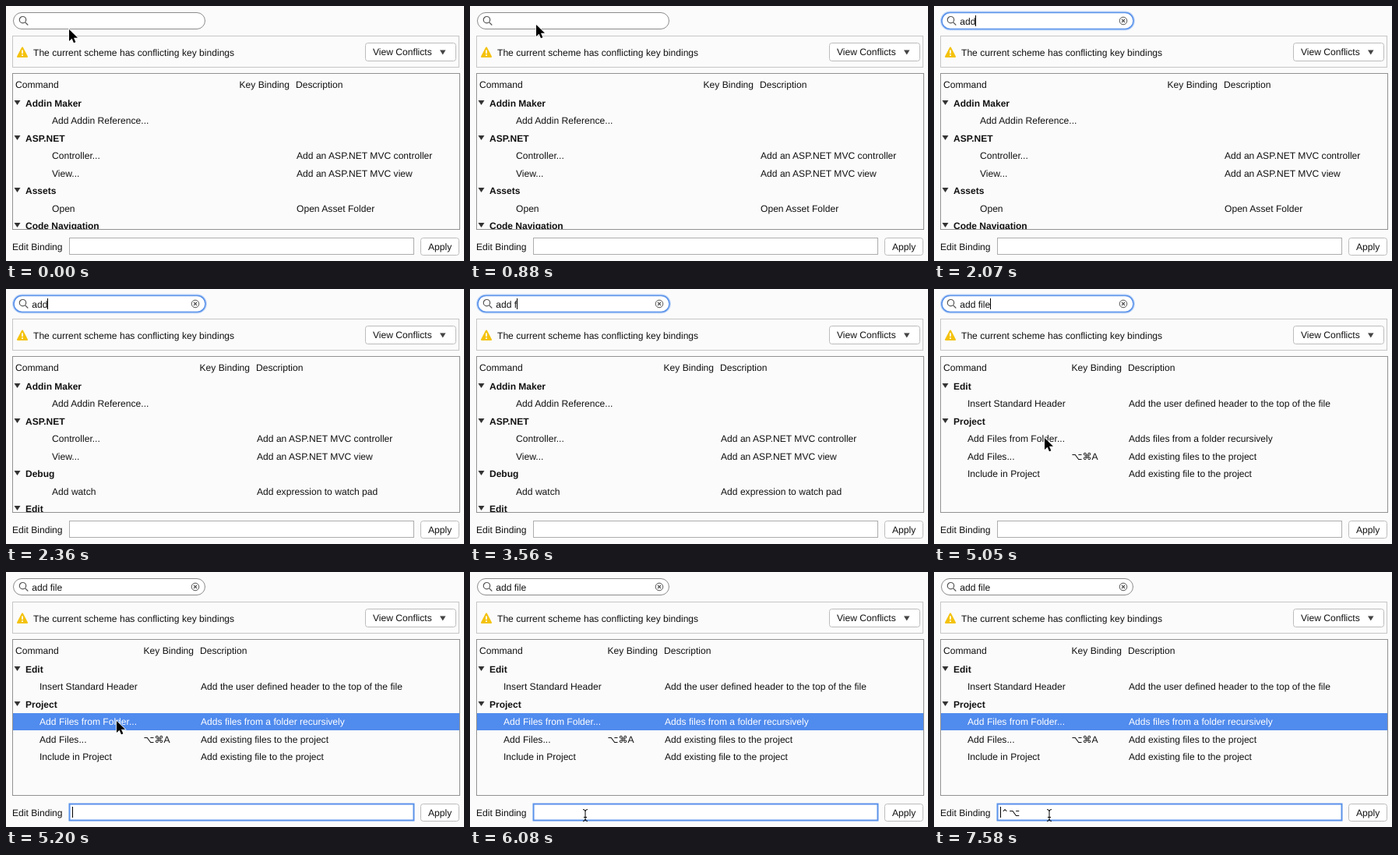
Animation, 588 px wide and 327 px high, one loop 8000 ms. Source, as an HTML page:

```html
<!DOCTYPE html>
<html lang="en">
<head>
<meta charset="utf-8">
<title>Key binding search</title>
<style>
  html, body { margin: 0; width: 100%; height: 100%; overflow: hidden; background: #fbfbfb; }
  svg { display: block; width: 588px; height: 327px; }
  text {
    font: 12.1px "Liberation Sans", "DejaVu Sans", sans-serif;
    fill: #111; white-space: pre; text-rendering: geometricPrecision;
  }
  .group { font-weight: bold; font-size: 12px; }
  .selected { fill: #fff; }
  .line { fill: none; stroke: #555; }
  .focus { fill: #fff; stroke: #5a92ea; stroke-width: 2; }
</style>
</head>
<body>
<svg viewBox="0 0 588 327">
  <defs><clipPath id="tableClip"><rect x="9" y="87" width="573" height="199"/></clipPath></defs>
  <rect width="588" height="327" fill="#fbfbfb"/>

  <rect x="9.5" y="8.5" width="246" height="21" rx="10.5" fill="#fff" stroke="#8c8c8c"/>
  <g id="searchFocus">
    <rect x="9" y="7.5" width="248" height="23" rx="11.5" fill="none" stroke="#c3d8f8" stroke-width="2"/>
    <rect class="focus" x="10" y="8.5" width="246" height="21" rx="10.5" style="stroke-width:1.6"/>
  </g>
  <g class="line" stroke-width="1.2"><circle cx="21.5" cy="17.7" r="4.2"/><path d="M24.6 20.8L28.3 24.5"/></g>
  <g id="clearIcon" class="line"><circle cx="243" cy="19" r="4.8"/><path d="M241 17l4 4m0-4l-4 4" stroke-width="1.2"/></g>
  <text id="query" x="33.2" y="24"/>
  <rect id="searchCaret" y="12" width="1" height="14"/>

  <rect class="line" x="8.5" y="38.5" width="573" height="40" style="stroke:#c6c6c6"/>
  <path d="M21 53.5L27 65H15Z" fill="#f4c20d" stroke="#f4c20d" stroke-width="2" stroke-linejoin="round"/>
  <path d="M21 56.5v4.5m0 1.3v1.7" stroke="#fff" stroke-width="1.7"/>
  <text x="35" y="64">The current scheme has conflicting key bindings</text>
  <rect x="461.5" y="47.5" width="116" height="23" rx="3" fill="#fff" stroke="#bcbcbc"/>
  <text x="471" y="63">View Conflicts</text>
  <path d="M557 56.5h7.5l-3.75 6Z" fill="#444"/>

  <g id="table" clip-path="url(#tableClip)"></g>
  <rect class="line" x="8.5" y="86.5" width="574" height="200" style="stroke:#929292"/>

  <text x="8" y="313">Edit Binding</text>
  <rect x="81.5" y="297.5" width="442" height="21" fill="#fff" stroke="#adadad"/>
  <rect id="editFocus" class="focus" x="81.5" y="297.5" width="442" height="21"/>
  <text id="binding" x="86" y="313">⌃⌥</text>
  <rect id="editCaret" x="85" y="301" width="1" height="14"/>
  <rect x="532.5" y="297.5" width="49" height="22" rx="3" fill="#fff" stroke="#bcbcbc"/>
  <text x="542" y="313">Apply</text>

  <path id="arrow" d="M0 0V15L3.6 11.7 6 17.2 8.4 16.2 6 10.8H11Z" stroke="#fff" stroke-width="1.4" paint-order="stroke"/>
  <path id="beam" d="M145 304.5q3 0 3 2.5q0-2.5 3-2.5M148 307v10M145 319.5q3 0 3-2.5q0 2.5 3 2.5M146 314.5h4" class="line" style="stroke:#000"/>
</svg>
<script>
const LOOP = 8000;
const $ = id => document.getElementById(id);

// Rows: a string is a group heading, an array is [command, description, binding].
const aspRows = [
  "Addin Maker", ["Add Addin Reference..."],
  "ASP.NET", ["Controller...", "Add an ASP.NET MVC controller"], ["View...", "Add an ASP.NET MVC view"],
];
const tables = {
  all: { indent: 59, keyX: 299.5, descX: 373, rows: [...aspRows,
    "Assets", ["Open", "Open Asset Folder"], "Code Navigation"] },
  add: { indent: 59, keyX: 248.5, descX: 322, rows: [...aspRows,
    "Debug", ["Add watch", "Add expression to watch pad"], "Edit"] },
  file: { indent: 43, keyX: 176.5, descX: 250, rows: [
    "Edit", ["Insert Standard Header", "Add the user defined header to the top of the file"],
    "Project", ["Add Files from Folder...", "Adds files from a folder recursively"],
    ["Add Files...", "Add existing files to the project", "⌥⌘A"],
    ["Include in Project", "Add existing file to the project"]] },
};
const SELECTED_ROW = 3;

// Each track is a list of [start time, value]; values hold until the next entry.
const tracks = {
  query: [[0, ""], [1620, "a"], [1770, "ad"], [2070, "add"], [3260, "add "],
    [3560, "add f"], [3710, "add fi"], [3860, "add fil"], [4000, "add file"]],
  table: [[0, "all"], [2220, "add"], [3710, "file"]],
  focus: [[0, ""], [1180, "search"], [5200, "edit"]],
  editCaret: [[0, false], [5200, true], [5800, false], [6380, true], [7280, false], [7580, true]],
  pointer: [[0, [81, 30]], [440, [83, 31]], [590, [86, 32]], [740, [86, 28]], [880, [85, 24]],
    [1620, null], [4450, [137, 129]], [4600, [141, 175]], [4750, [145, 212]], [4900, [143, 200]],
    [5050, [142, 191]], [5500, [144, 203]], [5650, [146, 232]], [5800, [147, 262]],
    [5940, [147, 287]], [6080, null]],
};
const valueAt = (name, t) => tracks[name].findLast(([start]) => start <= t)[1];

const label = (x, y, text, cls = "") => `<text x="${x}" y="${y}" class="${cls}">${text}</text>`;

function tableMarkup({ indent, keyX, descX, rows }, selected) {
  let out = label(12, 105, "Command") + label(keyX, 105, "Key Binding") + label(descX - 1, 105, "Description");
  rows.forEach((row, i) => {
    const y = Math.round(129 + 22.45 * i);
    if (typeof row === "string") {
      out += `<path d="M10.5 ${y - 8}h8l-4 6Z" fill="#333"/>` + label(25, y, row, "group");
      return;
    }
    const active = selected && i === SELECTED_ROW;
    const cls = active ? "selected" : "";
    if (active) out += `<rect x="9" y="181" width="573" height="22" fill="#508bee"/>`;
    const [command, description = "", binding = ""] = row;
    out += label(indent, y, command, cls) + label(keyX, y, binding, cls) + label(descX, y, description, cls);
  });
  return out;
}

const show = (id, visible) => $(id).setAttribute("visibility", visible ? "visible" : "hidden");

let drawnTable = "";
function render(t) {
  const query = valueAt("query", t);
  const focus = valueAt("focus", t);
  const pointer = valueAt("pointer", t);

  const markup = tableMarkup(tables[valueAt("table", t)], focus === "edit");
  if (markup !== drawnTable) $("table").innerHTML = drawnTable = markup;

  $("query").textContent = query;
  const queryWidth = query ? $("query").getComputedTextLength() : 0;
  $("searchCaret").setAttribute("x", Math.round(33.2 + queryWidth));
  show("searchFocus", focus === "search");
  show("searchCaret", focus === "search");
  show("clearIcon", query);

  show("editFocus", focus === "edit");
  show("editCaret", valueAt("editCaret", t));
  show("binding", t >= 7280);

  show("arrow", pointer);
  if (pointer) $("arrow").setAttribute("transform", `translate(${pointer})`);
  show("beam", t >= 6080);
}

const startTime = performance.now();
function frame() {
  render((performance.now() - startTime) % LOOP);
  requestAnimationFrame(frame);
}
frame();
</script>
</body>
</html>
```
